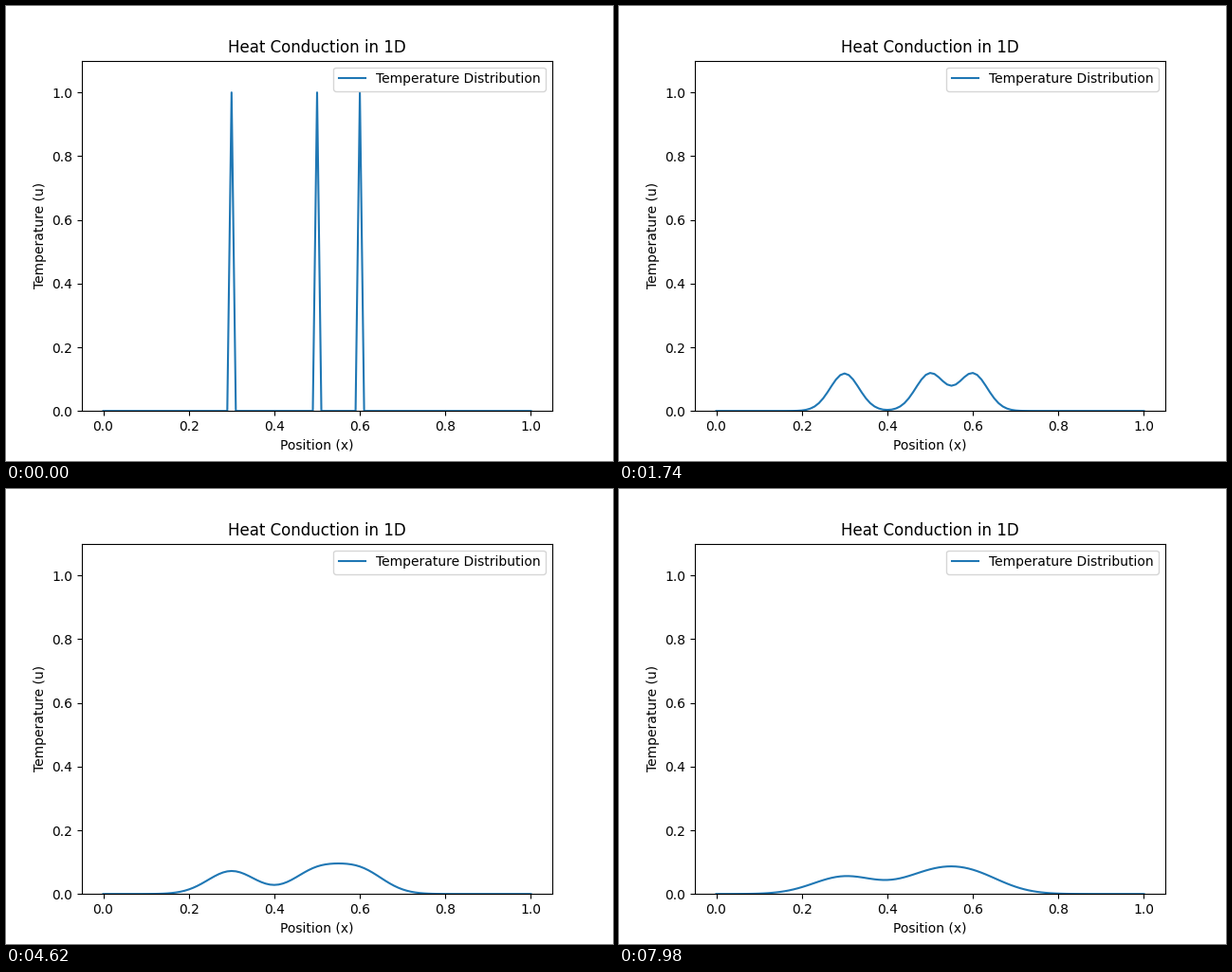
Recreate the animation shown at these times as a matplotlib script. Size 640 px wide and 480 px high, loop 8000 ms.

```python
import numpy as np
import matplotlib.pyplot as plt
from matplotlib.animation import FuncAnimation

LOOP_MS, TICK_MS, STEP_MS = 8000, 20, 30
CELLS = 100
ALPHA, DT = 0.01, 0.001
STEPS = LOOP_MS // STEP_MS

x = np.linspace(0, 1, CELLS + 1)
r = ALPHA * DT * CELLS ** 2


def solve():
    """Explicit finite differences with both ends held at zero."""
    u = np.zeros((STEPS + 1, CELLS + 1))
    u[0, [30, 50, 60]] = 1.0
    for n in range(STEPS):
        u[n + 1, 1:-1] = u[n, 1:-1] + r * np.diff(u[n], 2)
    return u


history = solve()

fig, ax = plt.subplots(figsize=(6.4, 4.8), dpi=100)
line, = ax.plot(x, history[0], label="Temperature Distribution")
ax.set_ylim(0, 1.1)
ax.set_title("Heat Conduction in 1D")
ax.set_xlabel("Position (x)")
ax.set_ylabel("Temperature (u)")
ax.legend(loc="upper right")


def update(i):
    # ticks are shorter than solver steps; round to the nearest step start
    step = (i * TICK_MS + TICK_MS // 2) // STEP_MS
    line.set_ydata(history[step])
    return line,


anim = FuncAnimation(fig, update, frames=LOOP_MS // TICK_MS,
                     interval=TICK_MS, repeat=True, repeat_delay=0)
plt.show()
```
